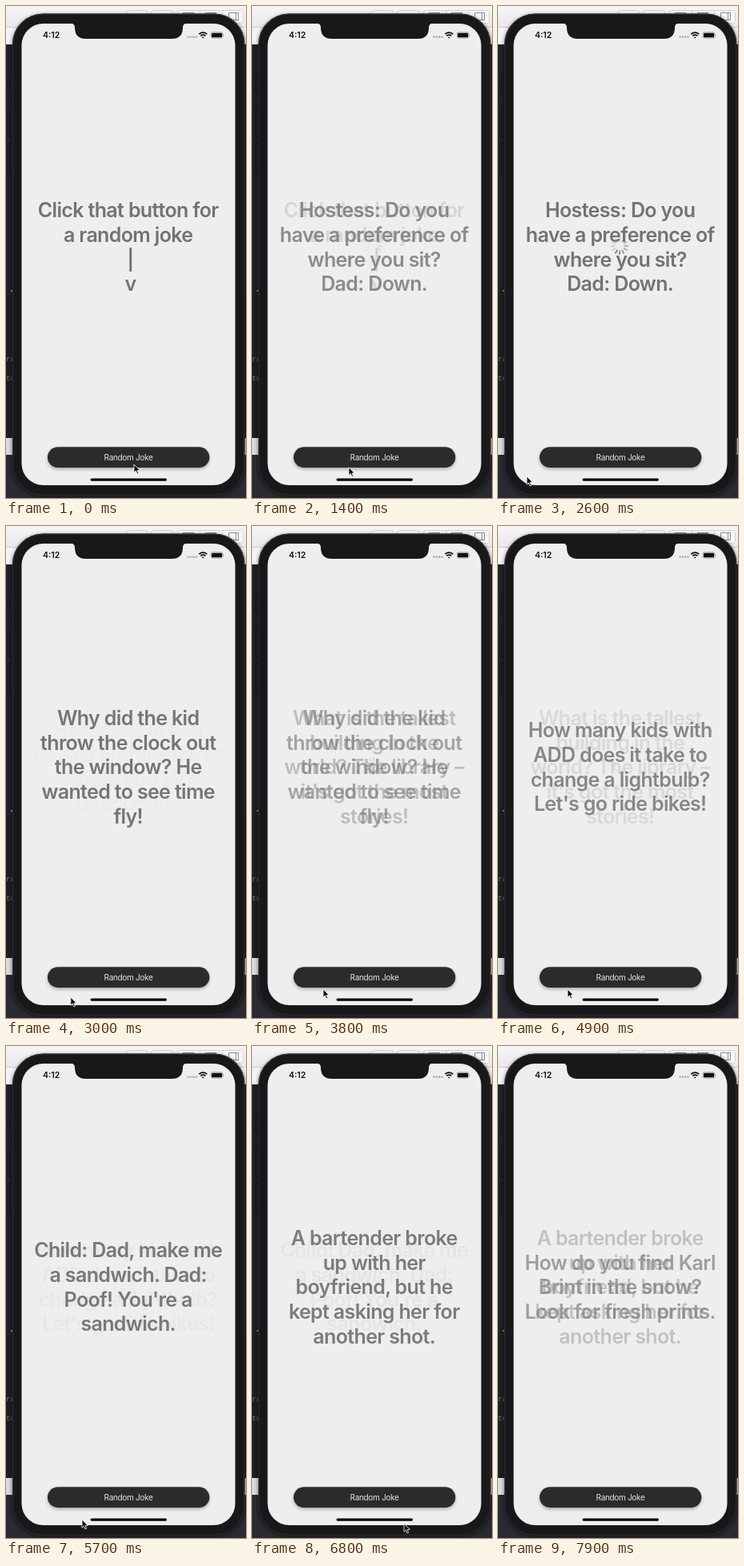
Animation of 300 by 615 pixels, one loop 8000 ms. Source, as an HTML page:

```html
<!DOCTYPE html>
<html lang="en">
<head>
<meta charset="utf-8">
<title>Random Joke</title>
<style>
  html, body { margin: 0; width: 100%; height: 100%; overflow: hidden; background: #1e1e25; }
  svg { display: block; width: 300px; height: 615px; }
  text { font-family: Inter, Roboto, sans-serif; font-optical-sizing: none; }
  .joke { font-size: 25px; font-weight: 600; letter-spacing: -.65px; fill: #747276; text-anchor: middle; }
  .code { font: 9px "Liberation Mono", monospace; fill: #77767d; }
  .label { font-size: 10px; letter-spacing: -.33px; fill: #e6e4e7; text-anchor: middle; }
  .clock { font-size: 10.5px; font-weight: 600; fill: #111; }
</style>
</head>
<body>
<svg viewBox="0 0 300 615">
  <defs>
    <filter id="soft" x="-20%" y="-20%" width="140%" height="150%"><feGaussianBlur stdDeviation="2"/></filter>
    <linearGradient id="toolbar" x2="0" y2="1">
      <stop stop-color="#f7f5f7"/><stop offset="1" stop-color="#e9e7e9"/>
    </linearGradient>
  </defs>

  <!-- desktop behind the phone -->
  <rect width="300" height="615" fill="#20202a"/>
  <rect width="300" height="27" fill="url(#toolbar)"/>
  <rect y="26" width="300" height="1" fill="#cfcdd0"/>
  <rect y="27" width="300" height="21" fill="#f3f2f4"/>
  <g fill="#f8f7f8" stroke="#d5d3d6">
    <rect x="150.500" y="5.500" width="26" height="16" rx="3"/>
    <rect x="181.500" y="5.500" width="27" height="16" rx="3"/>
    <rect x="214.500" y="5.500" width="82" height="16" rx="3"/>
  </g>
  <path d="M242.500 6v15M270.500 6v15" stroke="#d5d3d6"/>
  <g fill="none" stroke="#8b898d">
    <rect x="221.500" y="8.500" width="13" height="9"/>
    <rect x="249.500" y="8.500" width="13" height="9"/>
    <path d="M278.500 8.500h12v9h-12zM287.500 8.500v9"/>
  </g>
  <g fill="none" stroke="#121218">
    <rect x="4.500" y="86.500" width="9" height="21"/>
    <rect x="4.500" y="126.500" width="9" height="38"/>
    <rect x="4.500" y="171.500" width="9" height="38"/>
  </g>
  <rect y="362" width="300" height="178" fill="#1d1d25"/>
  <circle cx="7" cy="356" r=".9" fill="#c9c6a6"/>
  <text class="code" x="0" y="444">ra</text>
  <text class="code" x="0" y="468">tu</text>
  <rect y="540" width="300" height="22" fill="#dbdadc"/>
  <rect y="561" width="300" height="54" fill="#2a2a33"/>

  <!-- phone -->
  <rect x="7" y="10" width="293" height="604" rx="39" fill="#000" opacity=".4" filter="url(#soft)"/>
  <rect x="8" y="9.500" width="290.500" height="602.500" rx="38" fill="#18171a"/>
  <rect x="8.700" y="10.200" width="289" height="601" rx="37.500" fill="none" stroke="#303034" stroke-width="1"/>
  <rect x="19.500" y="22" width="267" height="577" rx="27" fill="#efedf0"/>
  <path d="M81 21.500q5 .5 5 5.500q0 14 14 14h107q14 0 14-14q0-5 5-5.500z" fill="#18171a"/>

  <!-- status bar -->
  <text class="clock" x="46" y="40">4:12</text>
  <path d="M226.500 38.700h12" stroke="#aaa8ac" stroke-width="2.200" stroke-dasharray="2.200 1.050"/>
  <g fill="none" stroke="#111" stroke-width="1.600">
    <path d="M241.300 35.200q5-4.200 10 0M243.200 37.400q3.100-2.500 6.200 0"/>
  </g>
  <path d="M244.900 38.900q1.400-1 2.800 0l-1.400 1.700z" fill="#111"/>
  <rect x="256" y="32.800" width="15.200" height="7.400" rx="2.200" fill="none" stroke="#8d8b8f" stroke-width=".7"/>
  <rect x="257" y="33.800" width="13.200" height="5.400" rx="1.300" fill="#111"/>
  <path d="M272.200 35.200q1.100 1.300 0 2.600z" fill="#8d8b8f"/>

  <g id="jokes"></g>
  <g id="spinner" transform="translate(152 300)"></g>

  <!-- controls -->
  <rect x="52" y="553" width="202" height="26" rx="13" fill="#000" opacity=".3" filter="url(#soft)"/>
  <rect x="52" y="551.300" width="202.300" height="25.700" rx="12.850" fill="#2c2a2d"/>
  <text class="label" x="153" y="567.800">Random Joke</text>
  <rect x="105.500" y="590.500" width="95.500" height="3.200" rx="1.600" fill="#050505"/>
  <path id="cursor" d="M0 0V10.200L2.400 8L4 11.900L5.700 11.200L4.100 7.400H7.200Z"
        fill="#0a0a0a" stroke="#fff" stroke-width=".8"/>
</svg>

<script>
const LOOP = 8000, STEP = 100, FADE = 350, LOAD = 360;
const LINE = 30.7, MIDDLE = 301.4, SPOKES = 12;

const jokes = [
  { at: -FADE, lines: ["Click that button for", "a random joke", "\u00a0|", "\u00a0v"] },
  { at: 1150, lines: ["Hostess: Do you", "have a preference of", "where you sit?", "Dad: Down."] },
  { at: 2680, lines: ["Why did the kid", "throw the clock out", "the window? He", "wanted to see time", "fly!"] },
  { at: 3650, lines: ["What is the tallest", "building in the", "world? The library –", "it's got the most", "stories!"] },
  { at: 4640, lines: ["How many kids with", "ADD does it take to", "change a lightbulb?", "Let's go ride bikes!"] },
  { at: 5395, lines: ["Child: Dad, make me", "a sandwich. Dad:", "Poof! You're a", "sandwich."] },
  { at: 6505, lines: ["A bartender broke", "up with her", "boyfriend, but he", "kept asking her for", "another shot."] },
  { at: 7690, lines: ["How do you find Karl", "Brint in the snow?", "Look for fresh prints."] }
];

// time, x, y of the pointer tip
const path = [
  [0, 160, 573], [400, 152, 567], [700, 152, 567], [1100, 108, 596], [1600, 128, 566],
  [1900, 103, 568], [2200, 103, 568], [2600, 36, 588], [2900, 72, 596], [3200, 106, 569],
  [3500, 112, 568], [3800, 89, 579], [4000, 121, 571], [4200, 107, 571], [4400, 107, 571],
  [4900, 87, 579], [5100, 98, 570], [5400, 84, 590], [5700, 95, 592], [6100, 118, 569],
  [6450, 60, 594], [6800, 190, 597], [7200, 176, 572], [7600, 168, 568], [LOOP, 168, 568]
];
const POINTER_GONE = 7700;

const $ = id => document.getElementById(id);
const add = (parent, tag, attrs, text = "") => {
  const node = document.createElementNS("http://www.w3.org/2000/svg", tag);
  for (const key in attrs) node.setAttribute(key, attrs[key]);
  node.textContent = text;
  return parent.appendChild(node);
};
const clamp = v => Math.min(1, Math.max(0, v));
const ease = v => v * v * (3 - 2 * v);

for (const joke of jokes) {
  joke.node = add($("jokes"), "g", { class: "joke" });
  const top = MIDDLE + 9 - (joke.lines.length - 1) * LINE / 2;
  joke.lines.forEach((line, i) => add(joke.node, "text", { x: 152.7, y: top + i * LINE }, line));
}

const spokes = Array.from({ length: SPOKES }, (_, i) => add($("spinner"), "rect", {
  x: -1, y: -11, width: 2, height: 5.5, rx: 1, fill: "#89878c", transform: `rotate(${i * 360 / SPOKES})`
}));

function drawJokes(t) {
  const shown = jokes.map(joke => ease(clamp((t - joke.at) / FADE)));
  jokes.forEach((joke, i) => joke.node.setAttribute("opacity", shown[i] * (1 - (shown[i + 1] || 0))));

  const next = jokes.findIndex(joke => t < joke.at + FADE);
  const loading = next > 0 && t >= jokes[next].at - LOAD;
  $("spinner").setAttribute("opacity", loading ? 1 - shown[next] : 0);
  const head = Math.floor(t / 1000 * SPOKES);
  spokes.forEach((spoke, i) => {
    const age = ((head - i) % SPOKES + SPOKES) % SPOKES;
    spoke.setAttribute("opacity", Math.max(.3, 1 - age * .1));
  });
}

function drawPointer(t) {
  const i = path.findIndex(point => point[0] > t);
  const [t0, x0, y0] = path[i - 1], [t1, x1, y1] = path[i];
  const p = ease((t - t0) / (t1 - t0));
  $("cursor").setAttribute("transform", `translate(${x0 + (x1 - x0) * p} ${y0 + (y1 - y0) * p})`);
  $("cursor").setAttribute("opacity", t < POINTER_GONE ? 1 : 0);
}

const start = performance.now();
function tick() {
  const elapsed = (performance.now() - start) % LOOP;
  const t = Math.floor(elapsed / STEP) * STEP;
  drawJokes(t);
  drawPointer(t);
  requestAnimationFrame(tick);
}
tick();
</script>
</body>
</html>
```
